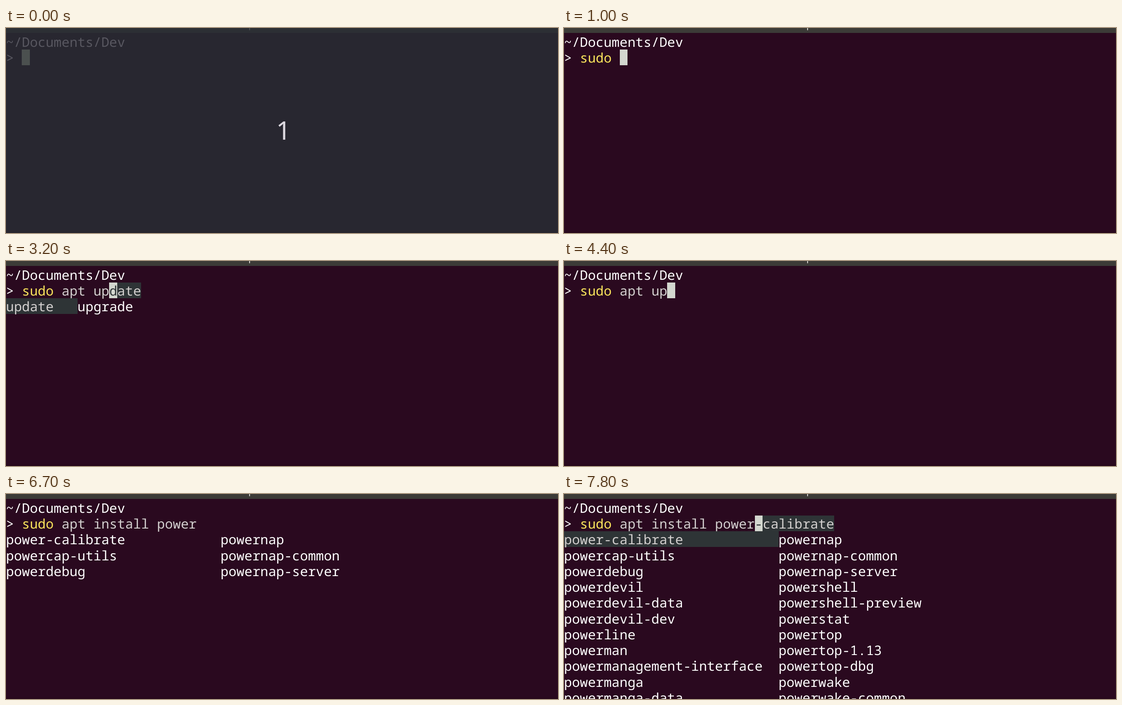
An HTML page with a canvas that plays this animation: 1226 by 457 pixels, repeating every 8000 ms.

```html
<!DOCTYPE html>
<html lang="en">
<head>
<meta charset="utf-8">
<title>Terminal completion</title>
<style>
html, body { margin: 0; width: 100%; height: 100%; overflow: hidden; background: #2a091f; }
canvas { display: block; }
</style>
</head>
<body>
<canvas id="stage" width="1226" height="457"></canvas>
<script>
const W = 1226, H = 457, LOOP = 8000;
const CELL = 17.65, LINE = 35.25, TOP = 12.6, BASE = 29.2;
const ctx = document.getElementById('stage').getContext('2d');

const LIVE = { bg: '#2a091f', edge: '#260719', bar: '#3c3b37', tick: '#d0cfca', text: '#ffffff',
  input: '#d3d0cf', command: '#fce55c', select: '#2e3436', cursor: '#d3d7cf' };
const DIMMED = { ...LIVE, bg: '#282730', edge: '#25242d', bar: '#2c2f34', tick: '#4c4f53',
  text: '#585760', cursor: '#4b504f' };

const verbs = { width: 9, columns: [['update'], ['upgrade']] };
const packages = { width: 27, columns: [
  ['power-calibrate', 'powercap-utils', 'powerdebug', 'powerdevil', 'powerdevil-data',
   'powerdevil-dev', 'powerline', 'powerman', 'powermanagement-interface', 'powermanga',
   'powermanga-data'],
  ['powernap', 'powernap-common', 'powernap-server', 'powershell', 'powershell-preview',
   'powerstat', 'powertop', 'powertop-1.13', 'powertop-dbg', 'powerwake', 'powerwake-common']
] };

// Each step: start time, typed input, and what differs from a plain prompt.
const steps = [
  [0, '', { countdown: '1' }],
  [100, '', { blink: true }],
  [300, ''],
  [500, 's'],
  [600, 'sud'],
  [900, 'sudo'],
  [1000, 'sudo '],
  [1400, 'sudo a'],
  [1500, 'sudo ap'],
  [2000, 'sudo apt'],
  [2300, 'sudo apt '],
  [2400, 'sudo apt up'],
  [2600, 'sudo apt up', { blink: true }],
  [2900, 'sudo apt up', { list: verbs, pick: 1 }],
  [3200, 'sudo apt up', { list: verbs, pick: 0 }],
  [3500, 'sudo apt up', { list: verbs, pick: 1 }],
  [4400, 'sudo apt up'],
  [4500, 'sudo apt '],
  [4700, 'sudo apt in'],
  [4800, 'sudo apt inst'],
  [5200, 'sudo apt install'],
  [5600, 'sudo apt install '],
  [6200, 'sudo apt install po'],
  [6300, 'sudo apt install powe'],
  [6500, 'sudo apt install power'],
  [6600, 'sudo apt install power', { list: packages, rows: 1, blink: true }],
  [6700, 'sudo apt install power', { list: packages, rows: 3, blink: true }],
  [6800, 'sudo apt install power', { list: packages, rows: 6, blink: true }],
  [6900, 'sudo apt install power', { list: packages, rows: 9, blink: true }],
  [7000, 'sudo apt install power', { list: packages }],
  [7500, 'sudo apt install power', { list: packages, pick: 0 }],
  [7600, 'sudo apt install power', { list: packages, pick: 0, blink: true }],
  [7800, 'sudo apt install power', { list: packages, pick: 0 }]
];

function box(col, row, cells, color) {
  const x = Math.round(col * CELL), y = Math.round(TOP + row * LINE);
  ctx.fillStyle = color;
  ctx.fillRect(x, y, Math.round((col + cells) * CELL) - x, Math.round(TOP + (row + 1) * LINE) - y);
}

function write(text, col, row, color) {
  ctx.fillStyle = color;
  ctx.fillText(text, col * CELL, TOP + row * LINE + BASE);
}

function drawList(list, rows, pick, colors) {
  list.columns.forEach((items, c) => {
    const col = c * list.width;
    items.slice(0, rows).forEach((item, r) => {
      const picked = r === 0 && c === pick;
      if (picked) box(col, 2, c ? item.length : list.width, colors.select);
      write(item, col, r + 2, picked ? colors.input : colors.text);
    });
  });
}

function drawPrompt(input, opts, colors) {
  write('~/Documents/Dev', 0, 0, colors.text);
  write('>', 0, 1, colors.text);
  const command = input.slice(0, 4), args = input.slice(5);
  write(command, 2, 1, colors.command);
  write(args, 7, 1, colors.input);

  const caret = 2 + input.length;
  let rest = '';
  if (opts.pick !== undefined) {
    const typed = input.split(' ').pop();
    rest = opts.list.columns[opts.pick][0].slice(typed.length);
    box(caret, 1, rest.length, colors.select);
    write(rest, caret, 1, colors.input);
  }
  if (!opts.blink) {
    box(caret, 1, 1, colors.cursor);
    write(rest.charAt(0), caret, 1, colors.select);
  }
}

function draw(time) {
  const [, input, opts = {}] = steps.findLast(step => step[0] <= time);
  const colors = opts.countdown ? DIMMED : LIVE;
  ctx.fillStyle = colors.bg;
  ctx.fillRect(0, 0, W, H);
  ctx.fillStyle = colors.edge;
  ctx.fillRect(0, H - 3, W, 3);
  ctx.fillStyle = colors.bar;
  ctx.fillRect(0, 0, W, 11);
  ctx.fillStyle = colors.tick;
  ctx.fillRect(540, 0, 2, 5);

  ctx.font = '500 29.42px "Noto Sans Mono", monospace';
  ctx.textRendering = 'geometricPrecision';
  drawPrompt(input, opts, colors);
  if (opts.list) drawList(opts.list, opts.rows, opts.pick, colors);
  if (opts.countdown) {
    ctx.font = '500 57px "Noto Sans", sans-serif';
    ctx.fillStyle = '#dcd8df';
    ctx.fillText(opts.countdown, 600, 249);
  }
}

const start = performance.now();
function tick() {
  draw((performance.now() - start) % LOOP);
  requestAnimationFrame(tick);
}
tick();
</script>
</body>
</html>
```
